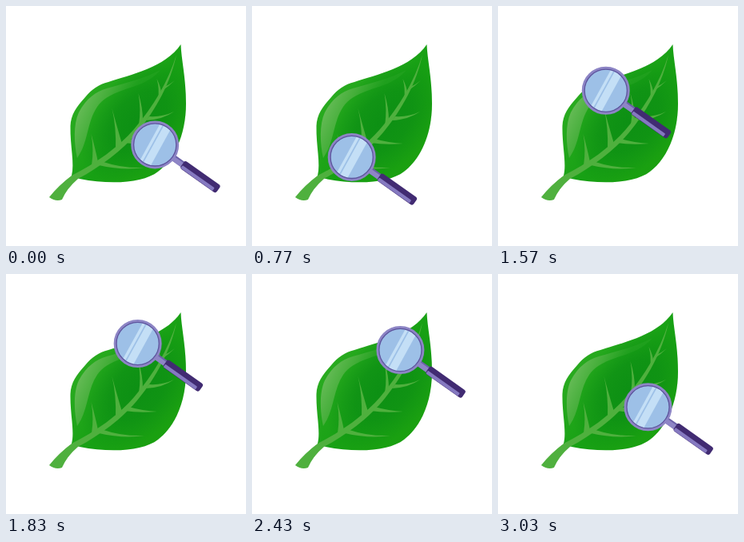
An HTML page for the animation above (5010 ms loop, 300 by 300 pixels).

```html
<!DOCTYPE html>
<html lang="en">
<head>
<meta charset="utf-8">
<title>Leaf and magnifier</title>
<style>
html, body { margin: 0; width: 100%; height: 100%; overflow: hidden; background: #fff; }
svg { display: block; width: 100vw; height: 100vh; }
</style>
</head>
<body>
<svg viewBox="0 0 300 300">
  <defs>
    <linearGradient id="blade" gradientUnits="userSpaceOnUse" x1="95" y1="110" x2="210" y2="195">
      <stop offset="0" stop-color="#2aab20"/>
      <stop offset=".5" stop-color="#17a014"/>
      <stop offset="1" stop-color="#1ba010"/>
    </linearGradient>
    <linearGradient id="gloss" gradientUnits="userSpaceOnUse" x1="88" y1="125" x2="140" y2="150">
      <stop offset="0" stop-color="#6cbd5c"/>
      <stop offset=".5" stop-color="#4cb040" stop-opacity=".85"/>
      <stop offset="1" stop-color="#2fa82a" stop-opacity=".35"/>
    </linearGradient>
    <radialGradient id="shade" gradientUnits="userSpaceOnUse" cx="0" cy="0" r="1" gradientTransform="translate(165 144) rotate(-48) scale(88 56)">
      <stop offset="0" stop-color="#0c8e14" stop-opacity=".9"/>
      <stop offset=".5" stop-color="#0c8e14" stop-opacity=".7"/>
      <stop offset="1" stop-color="#0c8e14" stop-opacity="0"/>
    </radialGradient>
    <clipPath id="glass"><circle r="26.5"/></clipPath>
    <path id="leaf" d="M218.5 48C219 66 225 90 225 122C225 163 209 193 190 207C172 221 132 224 92 216L82 212C86 197 80 175 80.5 150C81 136 88 126 99 114C107 104 116 98 128 95C155 86 199 77 218.5 48Z"/>
  </defs>

  <use href="#leaf" fill="url(#blade)"/>
  <use href="#leaf" fill="url(#shade)"/>
  <path fill="url(#gloss)" d="M89 190C85 172 84 148 91 133C100 116 112 107 126 103C150 96 172 91 193 80C178 97 160 100 144 106C130 111 120 117 114 126C101 145 103 171 89 190Z"/>
  <g fill="#4fb03e">
    <path d="M54 239Q66 224 82 212C112 197 141 176 160 154C184 126 203 94 213 61C206 95 188 129 164 158C145 181 118 201 90 216Q76 228 70 242Q62 245 54 239Z"/>
    <path d="M107 199Q110 180 106.500 160Q112 180 115 195Z"/>
    <path d="M137 179Q138 152 132.500 128Q139 152 145 172Z"/>
    <path d="M166 149Q169 130 165.500 109Q171 127 171 143Z"/>
    <path d="M190 117Q192 104 188.500 91Q194 102 194 109Z"/>
    <path d="M122 195Q145 203 173 202Q146 206 116 199Z"/>
    <path d="M153 166Q171 171 189 172Q167 174 148 171Z"/>
    <path d="M179 138Q196 139 210 132Q196 142 175 143Z"/>
    <path d="M198 101Q205 98 211 93Q204 100 195 106Z"/>
  </g>

  <g id="lens">
    <g transform="rotate(35.3)">
      <rect x="27" y="-4" width="22" height="8" fill="#6b60a8"/>
      <rect x="28" y="-2" width="21" height="6" fill="#8e85c6"/>
      <rect x="42" y="-5.800" width="55" height="11.600" rx="3" fill="#412b72"/>
      <rect x="43" y="1" width="49" height="4.400" rx="1" fill="#8579c0"/>
    </g>
    <circle r="26.8" fill="#9dc0e7"/>
    <g clip-path="url(#glass)" fill="#c4dff6">
      <path d="M8.500 -30H12.500L-20.500 30H-24.500Z"/>
      <path d="M14.500 -30H25.500L-7.500 30H-18.500Z"/>
    </g>
    <circle r="28.2" fill="none" stroke="#8d85c5" stroke-width="3.600"/>
    <circle r="26.6" fill="none" stroke="#5d549e" stroke-width="1.300"/>
  </g>
</svg>
<script>
const LOOP = 5010, STEP = 100 / 3, LAST = 91;
const lens = document.getElementById('lens');

// Each move: start ms, end ms, from, to
const moves = [
  [0, 400, [186.2, 173.4], [125.8, 193.5]],
  [700, 1130, [125.8, 193.5], [109, 122]],
  [1180, 2167, [109, 122], [184.8, 74.3]],
  [2167, 3033, [184.8, 74.3], [187.5, 166.3]]
];

function ease(u) {
  u = Math.min(1, Math.max(0, u));
  return u * u * (3 - 2 * u);
}

function position(t) {
  const [start, end, a, b] = moves.filter(m => m[0] <= t).pop();
  const k = ease((t - start) / (end - start));
  return a.map((v, i) => v + (b[i] - v) * k);
}

function draw(ms) {
  const step = Math.min(LAST, Math.floor((ms % LOOP + 3.4) / STEP));
  const [x, y] = position(step * STEP);
  lens.setAttribute('transform', `translate(${x.toFixed(2)} ${y.toFixed(2)})`);
}

const begin = performance.now();
function tick() {
  draw(performance.now() - begin);
  requestAnimationFrame(tick);
}
tick();
</script>
</body>
</html>
```
